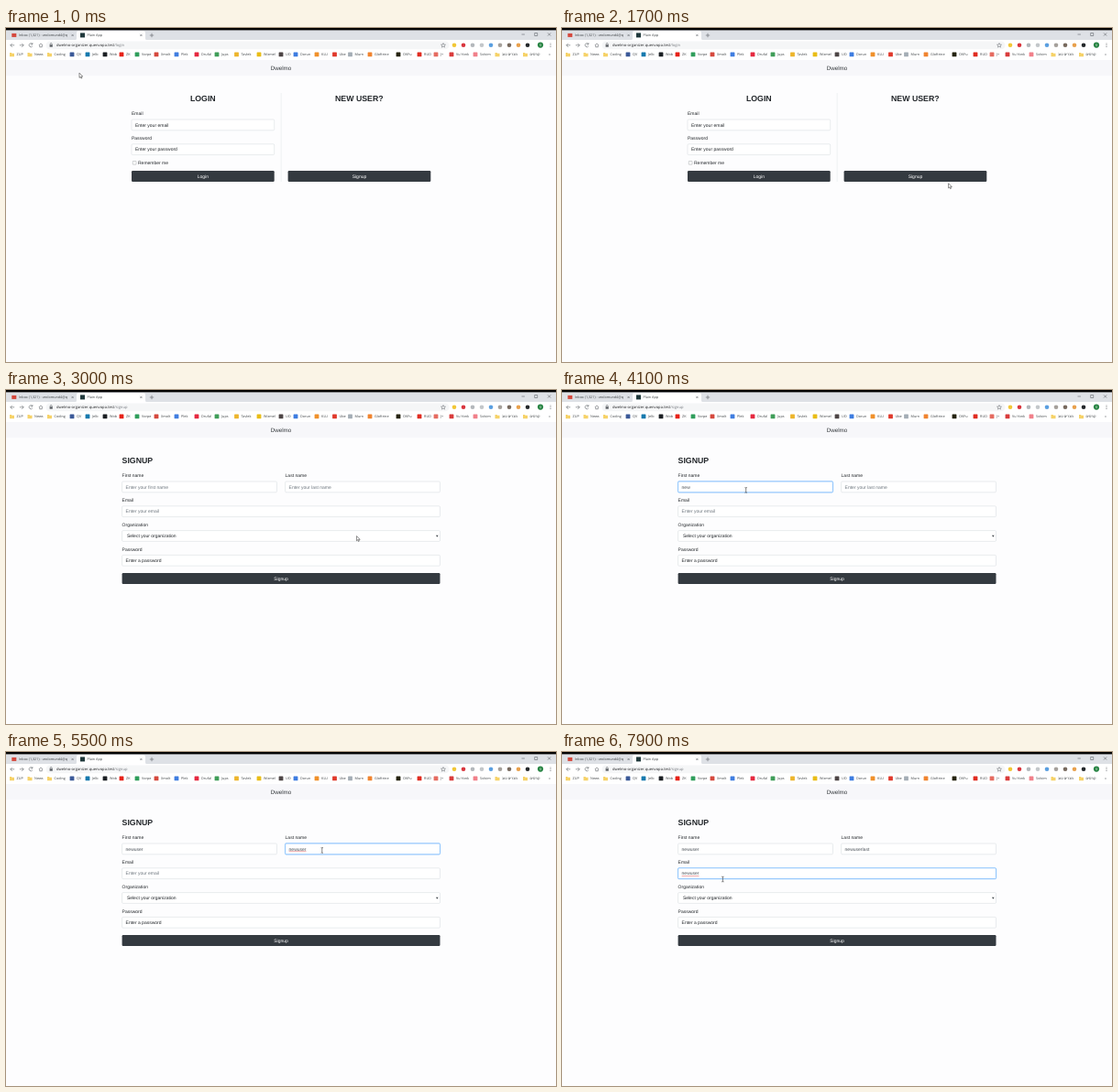
An HTML page that plays this animation: 600 px wide and 365 px high, repeating every 8 s.

```html
<!DOCTYPE html>
<html lang="en">
<head>
<meta charset="utf-8">
<title>Signup walkthrough</title>
<style>
  html, body { margin: 0; width: 100%; height: 100%; overflow: hidden; background: #fdfdfe; }
  svg { display: block; width: 600px; height: 365px; }
  text { font: 5px "Liberation Sans", Arial, sans-serif; fill: #212529; text-rendering: geometricPrecision; white-space: pre; }
  .ui, .ui text { font: 3.75px "Open Sans", sans-serif; fill: #3c4043; }
  .line { fill: none; stroke: #5f6368; stroke-width: .6; }
  .title { font-size: 8.75px; font-weight: bold; }
  .mid { text-anchor: middle; }
  .hint { fill: #6c757d; }
  .value { fill: #495057; }
  .onDark { fill: #fff; text-anchor: middle; }
  .field { fill: #fff; stroke: #ced4da; stroke-width: .45; }
  .ring { fill: none; stroke: #bfdeff; stroke-width: 1.3; }
  .focus .field { stroke: #6db3fb; stroke-width: .7; }
  .ring, .squiggle { visibility: hidden; }
  .focus .ring { visibility: visible; }
  .squiggle { stroke: #e25555; stroke-width: .5; }
  .button { fill: #343a40; }
  .button.hover { fill: #1f2327; }
</style>
</head>
<body>
<svg viewBox="0 0 600 365">
  <rect width="600" height="365" fill="#fdfdfe"/>

  <g id="browser" class="ui">
    <rect y="2" width="600" height="11" fill="#dee1e6"/>
    <rect width="600" height="2.4" fill="#000"/>
    <path d="M75.5 13Q77 13 77 11.5V5Q77 3.2 79 3.2H150Q152 3.2 152 5V11.5Q152 13 153.5 13Z" fill="#fff"/>
    <rect y="13" width="600" height="22" fill="#fff"/>
    <rect x="6.3" y="5.9" width="5" height="4" fill="#d5483d"/>
    <text x="14" y="9.3">Inbox (1,321) - vexlomund4@q</text>
    <rect x="81" y="5.4" width="5" height="5" fill="#20393c"/>
    <text x="88.5" y="9.3">Plain App</text>
    <path class="line" d="M71.5 6.8l2.2 2.2m0-2.2l-2.2 2.2M146.3 6.8l2.2 2.2m0-2.2l-2.2 2.2M156.8 8h4.4m-2.2-2.2v4.4
      M562.5 7h3.4M576.7 5.5h3v3h-3zM591 5.4l3.2 3.2m0-3.2l-3.2 3.2"/>
    <rect x="43.5" y="14.5" width="440" height="8.8" rx="4.4" fill="#f5f6f7"/>
    <path class="line" d="M9.2 18.8H4.8m2-2l-2 2l2 2M14.8 18.8h4.4m-2-2l2 2l-2 2M28.8 17.6a2 2 0 1 0 .1 2.1m0-3.6v1.8h-1.8
      M36 18.8l2-2l2 2M36.7 18.4v2.4h2.6v-2.4M48.2 18.3v-.8a1 1 0 0 1 2 0v.8"/>
    <rect x="47.6" y="18.2" width="3.2" height="2.5" fill="#5f6368"/>
    <text x="55" y="20.2" style="font-size:4.1px;fill:#202124">dwelmo-organizer.quenvopa.test<tspan id="path" fill="#777b80">/login</tspan></text>
    <path class="line" style="stroke-width:.5" d="M477 16.5l.7 1.6l1.8.1l-1.4 1.1l.5 1.8l-1.6-1l-1.6 1l.5-1.8l-1.4-1.1l1.8-.1z"/>
    <circle cx="583" cy="18.6" r="3.1" fill="#278443"/>
    <text class="mid" x="583" y="19.9" style="fill:#fff">V</text>
    <g fill="#5f6368"><circle cx="594" cy="17" r=".5"/><circle cx="594" cy="18.7" r=".5"/><circle cx="594" cy="20.4" r=".5"/></g>
    <text x="592" y="30.2">»</text>
  </g>

  <rect y="35" width="600" height="17.3" fill="#f7f7fa"/>
  <text class="mid" x="300" y="45.8" style="font-size:6.25px;fill:#33373b">Dwelmo</text>

  <g id="login">
    <path d="M300.2 71V168" stroke="#dfe3e7" stroke-width=".5"/>
    <text class="title mid" x="214.8" y="80.3">LOGIN</text>
    <text class="title mid" x="385.3" y="80.3">NEW USER?</text>
    <rect x="138.3" y="145.5" width="3.7" height="3.7" rx=".4" fill="#fff" stroke="#8a8d91" stroke-width=".4"/>
    <text x="144" y="149.2">Remember me</text>
  </g>
  <g id="signup">
    <text class="title" x="126.6" y="80.3">SIGNUP</text>
  </g>

  <g id="cursor">
    <path id="arrow" d="M0 0V5.2L1.2 4.1L2 5.9L2.9 5.5L2.1 3.8H3.7Z" fill="#fff" stroke="#222" stroke-width=".5"/>
    <path id="hand" d="M-.6 .4Q0-.4 .6 .4V2.6L3 3.1Q3.7 3.4 3.5 4.4L2.9 6.8H-.4L-2.3 4.3Q-1.8 3.3-.6 4.2Z" fill="#fff" stroke="#222" stroke-width=".5"/>
    <path id="beam" d="M-1.2-2.8H-.3L0-2.5L.3-2.8H1.2M0-2.5V2.5M-1.2 2.8H-.3L0 2.5L.3 2.8H1.2" fill="none" stroke="#333" stroke-width=".6"/>
  </g>
</svg>

<script>
const LOOP = 8000, STEP = 100, PAGE_SWITCH = 2800;
const $ = id => document.getElementById(id);

function add(parent, tag, attrs, text = "") {
  const el = document.createElementNS("http://www.w3.org/2000/svg", tag);
  for (const key in attrs) el.setAttribute(key, attrs[key]);
  el.textContent = text;
  return parent.appendChild(el);
}

// Bookmarks: label, icon centre, colour (no colour means folder)
const bookmarks = [
  ["ZUP", 6.5], ["News", 26], ["Coding", 47.5], ["QV", 72, "#3b5998"], ["Jelb", 89, "#1679ad"],
  ["Wob", 108, "#1b1f23"], ["ZK", 126, "#e62117"], ["Vorpe", 143, "#2f9e5b"], ["Xmolt", 164, "#d5483d"],
  ["Plek", 186, "#3f7de0"], ["Drufal", 208, "#e5283f"], ["Jups", 230, "#3f9d58"], ["Tavlek", 251.5, "#edb52c"],
  ["Wizmel", 276, "#e9bd16"], ["UO", 300, "#4d4545"], ["Dorun", 316, "#3d7ce0"], ["KLU", 339, "#f0902a"],
  ["Ube", 358.5, "#e0392b"], ["Murn", 375.5, "#a4adb5"], ["Gloftrine", 397, "#f0842f"], ["OKFu", 428, "#25230f"],
  ["RUD", 451, "#e02b20"], ["J+", 469, "#e56b60"], ["Vu Yonk", 486, "#d93b3b"], ["Solvim", 512, "#f1808a"],
  ["מכרים טוב", 536], ["קורסים", 566.5]
];
for (const [label, x, color] of bookmarks) {
  if (color) add($("browser"), "rect", { x: x - 2.4, y: 26.4, width: 4.8, height: 4.8, rx: .5, fill: color });
  else add($("browser"), "path", { d: `M${x - 2.5} 27h2l.6.7h2.4v3.6h-5z`, fill: "#f6d268" });
  add($("browser"), "text", { x: x + 5.1, y: 30.2 }, label);
}

const extensions = ["#f2c736", "#d9363e", "#b4b8bc", "#c3c7ca", "#5a9fe0", "#a5a09b", "#77695d", "#e8a04c", "#25282b"];
extensions.forEach((fill, i) => add($("browser"), "circle", { cx: 489 + i * 10, cy: 18.7, r: 2.3, fill }));

const zones = [];

function button(page, x, y, width, label) {
  const box = add($(page), "rect", { class: "button", x, y, width, height: 11.9, rx: 1.2 });
  add($(page), "text", { class: "onDark", x: x + width / 2, y: y + 7.6 }, label);
  zones.push({ page, x, y, width, shape: "hand", box });
}

function field(page, x, y, width, label, hint, inset = 4) {
  const group = add($(page), "g", {});
  const box = { x, y, width, height: 11.8, rx: 1.2 };
  add(group, "text", { x, y: y - 4.6 }, label);
  add(group, "rect", { ...box, class: "ring" });
  add(group, "rect", { ...box, class: "field" });
  const text = add(group, "text", { x: x + inset, y: y + 7.6 }, hint);
  const squiggle = add(group, "path", { class: "squiggle" });
  zones.push({ page, x, y, width, shape: "beam" });
  return { group, text, squiggle, hint, left: x + inset, base: y + 8.7 };
}

field("login", 137, 100, 155.7, "Email", "Enter your email");
field("login", 137, 126.8, 155.7, "Password", "Enter your password");
button("login", 137, 156.1, 155.7, "Login");
button("login", 307.6, 156.1, 155.7, "Signup");

const first = field("signup", 126.6, 100, 168.9, "First name", "Enter your first name");
const last = field("signup", 304.6, 100, 168.9, "Last name", "Enter your last name");
const email = field("signup", 126.6, 126.8, 346.9, "Email", "Enter your email");
field("signup", 126.6, 153.6, 346.9, "Organization", "Select your organization", 5.3);
add($("signup"), "path", { d: "M469 158.8h2.6l-1.3 2z", fill: "#343a40" });
field("signup", 126.6, 180.4, 346.9, "Password", "Enter a password");
button("signup", 126.6, 200, 346.9, "Signup");
zones.find(z => z.page === "signup" && z.y > 150 && z.y < 160).shape = "arrow";

// Focus span and the moment each character lands
const ramp = (start, count, gap = STEP) => Array.from({ length: count }, (_, i) => start + i * gap);
const typing = [
  { input: first, from: 3600, to: 4700, word: "newuser", keys: ramp(3900, 7) },
  { input: last, from: 4700, to: 6800, word: "newuserlast", keys: [...ramp(4900, 7), ...ramp(5700, 4)] },
  { input: email, from: 6800, to: LOOP, word: "newuser", keys: [...ramp(7100, 3), ...ramp(7500, 3), 7800] }
];

// Pointer path: time, x, y
const path = [
  [0, 80, 49.2], [700, 80, 49.2], [1300, 549, 212.5], [1700, 421.6, 169.8], [2200, 397, 163.6], [2900, 397, 163.6],
  [3500, 200.7, 109.4], [4500, 200.7, 109.4], [4700, 344.8, 107.4], [6100, 344.8, 107.4],
  [6500, 178.7, 106], [6600, 178.7, 106], [6800, 175.4, 139], [LOOP, 175.4, 139]
];

function pointerAt(t) {
  const i = path.findIndex(p => p[0] > t);
  const [t0, x0, y0] = path[i - 1], [t1, x1, y1] = path[i];
  const k = (t - t0) / (t1 - t0), ease = k * k * (3 - 2 * k);
  return [x0 + (x1 - x0) * ease, y0 + (y1 - y0) * ease];
}

function drawInput({ input, from, to, word, keys }, t) {
  const focused = t >= from && t < to;
  const value = word.slice(0, keys.filter(key => key <= t).length);
  const misspelt = focused && value.length > 3;
  input.group.classList.toggle("focus", focused);
  input.text.textContent = value || input.hint;
  input.text.setAttribute("class", value ? "value" : "hint");
  input.squiggle.style.visibility = misspelt ? "inherit" : "hidden";
  if (misspelt) input.squiggle.setAttribute("d", `M${input.left} ${input.base}h${input.text.getComputedTextLength()}`);
}

function draw(now) {
  const t = Math.floor(now % LOOP / STEP) * STEP;
  const page = t < PAGE_SWITCH ? "login" : "signup";
  for (const id of ["login", "signup"]) $(id).style.display = id === page ? "" : "none";
  $("path").textContent = "/" + page;
  typing.forEach(entry => drawInput(entry, t));

  const [x, y] = pointerAt(t);
  const inside = z => z.page === page && x > z.x && x < z.x + z.width && y > z.y - .6 && y < z.y + 12.8;
  const zone = zones.find(inside);
  const shape = zone ? zone.shape : "arrow";
  for (const z of zones) if (z.box) z.box.classList.toggle("hover", z === zone);
  for (const id of ["arrow", "hand", "beam"]) $(id).style.display = id === shape ? "" : "none";
  $("cursor").setAttribute("transform", `translate(${x} ${y})`);
}

const start = performance.now();
function tick() {
  draw(performance.now() - start);
  requestAnimationFrame(tick);
}
tick();
</script>
</body>
</html>
```
